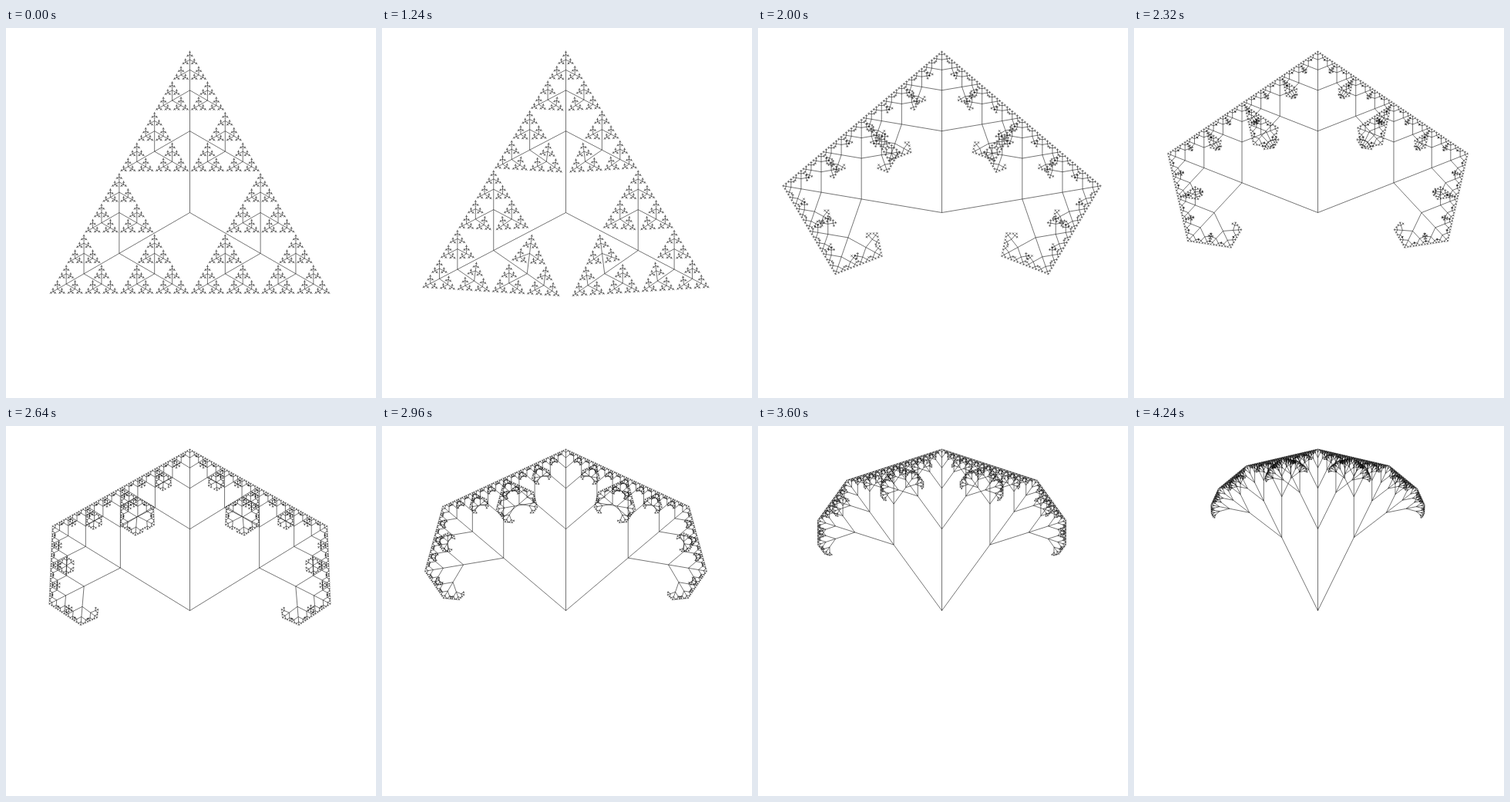
These frames come from a looping animation (480 by 480 pixels, 5920 ms). An HTML page with a canvas:

```html
<!DOCTYPE html>
<html lang="en">
<head>
<meta charset="utf-8">
<title>Folding three-way tree</title>
<style>
  html, body { margin: 0; width: 100%; height: 100%; overflow: hidden; background: #fff; }
  canvas { display: block; }
</style>
</head>
<body>
<canvas id="stage" width="480" height="480"></canvas>
<script>
const ctx = document.getElementById("stage").getContext("2d");
const LOOP = 5920, HOLD = 1240, STEP = 40, STEPS = 76;
const ROOT = { x: 238.5, y: 239.5 }, LENGTH = 105.8, DEPTH = 7;
const START_ANGLE = 120 * Math.PI / 180, DECAY = 0.02;

ctx.lineWidth = 0.55;

// Each segment is stroked on its own so that crossings grow darker
function branch(x, y, heading, length, spread, depth) {
  if (!depth) return;
  for (const side of [-1, 0, 1]) {
    const turn = heading + side * spread;
    const endX = x + length * Math.sin(turn);
    const endY = y - length * Math.cos(turn);
    ctx.beginPath();
    ctx.moveTo(x, y);
    ctx.lineTo(endX, endY);
    ctx.stroke();
    branch(endX, endY, turn, length / 2, spread, depth - 1);
  }
}

let shown = -1;
function draw(now) {
  const time = now % LOOP;
  const step = Math.max(0, Math.min(STEPS, Math.floor((time - HOLD) / STEP) + 1));
  if (step === shown) return;
  shown = step;
  ctx.fillStyle = "#fff";
  ctx.fillRect(0, 0, 480, 480);
  branch(ROOT.x, ROOT.y, 0, LENGTH, START_ANGLE * Math.exp(-DECAY * step), DEPTH);
}

function tick() {
  draw(performance.now());
  requestAnimationFrame(tick);
}
tick();
</script>
</body>
</html>
```
